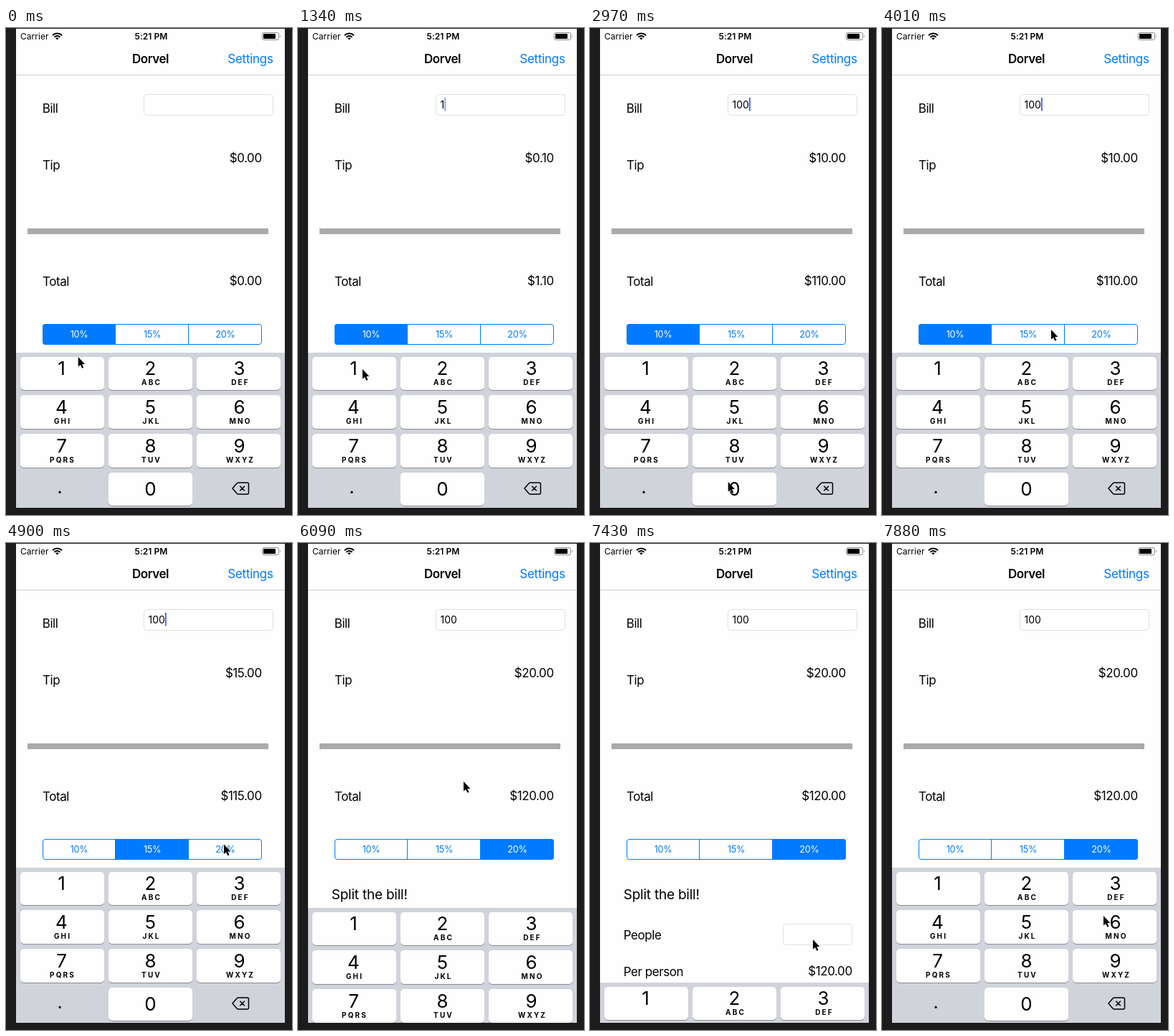
Recreate the animation shown at these times as an HTML page. Size 399 by 678 pixels, loop 8 s.

```html
<!DOCTYPE html>
<html lang="en">
<head>
<meta charset="utf-8">
<title>Tip calculator</title>
<style>
  html, body { margin: 0; width: 100%; height: 100%; overflow: hidden; background: #1c1c1c; }
  svg { display: block; width: 399px; height: 678px; font: 17px Inter, "Open Sans", sans-serif; letter-spacing: -.43px; }
  .end { text-anchor: end; }
  .mid { text-anchor: middle; }
  .blue { fill: #007aff; }
  .small { font-size: 12px; letter-spacing: .03px; }
  .seg { font-size: 12.7px; letter-spacing: -.3px; }
  .digit { font-size: 26px; letter-spacing: 0; }
  .letters { font-size: 10px; font-weight: 700; letter-spacing: 2.1px; }
  .field { fill: #fff; stroke: #dedede; }
  .line { fill: none; stroke: #000; }
</style>
</head>
<body>
<svg viewBox="0 0 399 678">
  <defs>
    <clipPath id="screen"><rect x="14" y="1" width="375" height="667"/></clipPath>
    <clipPath id="pill"><rect x="51" y="412" width="306" height="29" rx="4"/></clipPath>
  </defs>
  <g clip-path="url(#screen)">
    <rect x="14" width="375" height="668" fill="#fefefe"/>

    <text class="small" x="20" y="15.6">Carrier</text>
    <path class="line" stroke-width="2" d="M65 10.2a9.2 9.2 0 0 1 13 0M67.5 12.7a5.7 5.7 0 0 1 8 0"/>
    <path d="M69.3 14.2a3.2 3.2 0 0 1 4.4 0L71.5 16.6Z"/>
    <text class="small mid" x="202.5" y="15.6" font-weight="600">5:21 PM</text>
    <rect class="line" x="357.5" y="6.5" width="23" height="10" rx="2.2" style="stroke:#888"/>
    <rect x="359" y="8" width="17" height="7" rx=".8"/>
    <path d="M382 9.5q1.6 2 0 4Z" fill="#888"/>

    <text class="mid" x="201.5" y="49" font-weight="600">Dorvel</text>
    <text class="blue end" x="372.7" y="49" style="letter-spacing:-.27px">Settings</text>
    <rect x="14" y="65" width="375" height="1" fill="#cfcfcf"/>

    <text x="50.7" y="117.5">Bill</text>
    <rect class="field" x="192.5" y="92.5" width="180" height="29" rx="4"/>
    <text id="bill" x="198.5" y="112" style="font-size:14px;letter-spacing:0"></text>
    <rect id="caret" y="97" width="2" height="18.5" fill="#426bf2"/>
    <text x="51" y="196.5">Tip</text>
    <text id="tip" class="end" x="356.7" y="186.7"></text>
    <rect x="30" y="279" width="336" height="8" fill="#aaa"/>
    <text x="51" y="358.5">Total</text>
    <text id="total" class="end" x="356.7" y="357.7"></text>

    <g id="segments" clip-path="url(#pill)"></g>
    <rect x="51.5" y="412.5" width="305" height="28" rx="3.5" fill="none" stroke="#007aff"/>

    <text x="46.7" y="495.7" style="font-size:19px;letter-spacing:-.22px">Split the bill!</text>
    <text x="46.7" y="551.5">People</text>
    <rect class="field" x="269.5" y="530.5" width="96" height="29" rx="4"/>
    <text x="46.7" y="602.5">Per person</text>
    <text id="share" class="end" x="365.7" y="601.7"></text>

    <g id="keyboard"></g>
  </g>
  <path id="cursor" d="M0 0V13.6L3.1 10.9 5.4 15.7 7.5 14.8 5.3 10.1H9.4Z" stroke="#fff" paint-order="stroke"/>
</svg>
<script>
const LOOP = 8000, TICK = 148.4, KEYBOARD_HEIGHT = 216;
const $ = id => document.getElementById(id);

const rates = [10, 15, 20];
$('segments').innerHTML = rates.map((rate, i) => `
  <rect x="${51 + i * 102}" y="412" width="102" height="29"/>
  <rect x="${50 + i * 102}" y="412" width="1" height="29" fill="#007aff"/>
  <text class="seg mid" x="${102 + i * 102}" y="431">${rate}%</text>`).join('');

const rowTop = row => Math.floor(458 + row * 53.67);

function drawKey(key, i) {
  const col = i % 3, row = Math.floor(i / 3);
  if (key === '.') return '<text class="digit mid" x="75" y="648">.</text>';
  if (key === 'del') return `<path class="line" stroke-width="1.5" stroke-linejoin="round"
    d="M316 641L322 634Q323 633 324.5 633H336.5Q338.5 633 338.5 635V647Q338.5 649 336.5 649H324.5Q323 649 322 648ZM326.3 637.7l6.6 6.6m0-6.6l-6.6 6.6"/>`;
  const x = 20 + col * 123, y = rowTop(row), height = rowTop(row + 1) - 7 - y;
  const cx = 77.5 + col * 124, baseline = 483 + row * 54 + (key === '0' ? 6 : 0);
  const cap = (top, attrs) => `<rect x="${x}" y="${top}" width="117" height="${height}" rx="5" ${attrs}/>`;
  return cap(y + 1, 'fill="#898b8f"') + cap(y, `id="key${key[0]}" fill="#fefefe"`) +
    `<text class="digit mid" x="${cx}" y="${baseline}">${key[0]}</text>
     <text class="letters mid" x="${cx + 1.5}" y="${baseline + 14}">${key.slice(1)}</text>`;
}
const keys = ['1', '2ABC', '3DEF', '4GHI', '5JKL', '6MNO', '7PQRS', '8TUV', '9WXYZ', '.', '0', 'del'];
$('keyboard').innerHTML =
  `<rect x="14" y="452" width="375" height="${KEYBOARD_HEIGHT}" fill="#d0d3da"/>` + keys.map(drawKey).join('');

// Ticks at which things happen.
const typed = [9, 17, 19], picked = [29, 35], dismissed = 41;

const moves = [
  { from: 0, to: 3, x: 90, y: 475 },
  { from: 11, to: 16, x: 192.7, y: 632 },
  { from: 20, to: 23, x: 273, y: 412 },
  { from: 25, to: 27, x: 236, y: 420 },
  { from: 30, to: 33, x: 304, y: 419.5 },
  { from: 38, to: 39, x: 231, y: 332 },
  { from: 41, to: 47, x: 311, y: 552 },
  { from: 50, to: 53, x: 309, y: 519 }
];

const clamp = v => Math.min(1, Math.max(0, v));
const countPast = (events, tick) => events.filter(t => t <= tick).length;
const money = value => '$' + value.toFixed(2);

function ease(tick, from, to) {
  const p = clamp((tick - from) / (to - from));
  return p * p * (3 - 2 * p);
}

const pointerAt = tick => moves.reduce(([x, y], move) => {
  const p = ease(tick, move.from, move.to);
  return [x + (move.x - x) * p, y + (move.y - y) * p];
}, [100.7, 458]);

// The blink restarts with every typed digit.
function caretOpacity(tick) {
  if (tick >= dismissed) return 0;
  const age = tick - [2, ...typed].filter(t => t <= tick).concat(2).reduce((a, b) => Math.max(a, b));
  return clamp(.4 + 1.1 * Math.cos(2 * Math.PI * (age - 1.5) / 6.8));
}

function render(time) {
  const tick = Math.floor((time % LOOP + 12) / TICK);
  const bill = '100'.slice(0, countPast(typed, tick));
  const selected = countPast(picked, tick);
  const tip = bill * rates[selected] / 100, total = +bill + tip;

  $('bill').textContent = bill;
  $('tip').textContent = money(tip);
  $('total').textContent = $('share').textContent = money(total);
  $('caret').setAttribute('x', bill ? 198.5 + $('bill').getComputedTextLength() : 199);
  $('caret').setAttribute('opacity', caretOpacity(tick));

  rates.forEach((_, i) => {
    const [box, , label] = [...$('segments').children].slice(i * 3);
    box.setAttribute('fill', i === selected ? '#007aff' : '#fefefe');
    label.setAttribute('fill', i === selected ? '#fff' : '#007aff');
  });

  $('key0').setAttribute('fill', tick >= typed[1] && tick <= typed[2] ? '#b6bbc5' : '#fefefe');
  const slide = KEYBOARD_HEIGHT * (ease(tick, 40, 43) - ease(tick, 49, 52));
  $('keyboard').setAttribute('transform', `translate(0 ${Math.round(slide)})`);
  $('cursor').setAttribute('transform', `translate(${pointerAt(tick)})`);
}

const start = performance.now();
function frame() {
  render(performance.now() - start);
  requestAnimationFrame(frame);
}
frame();
</script>
</body>
</html>
```
